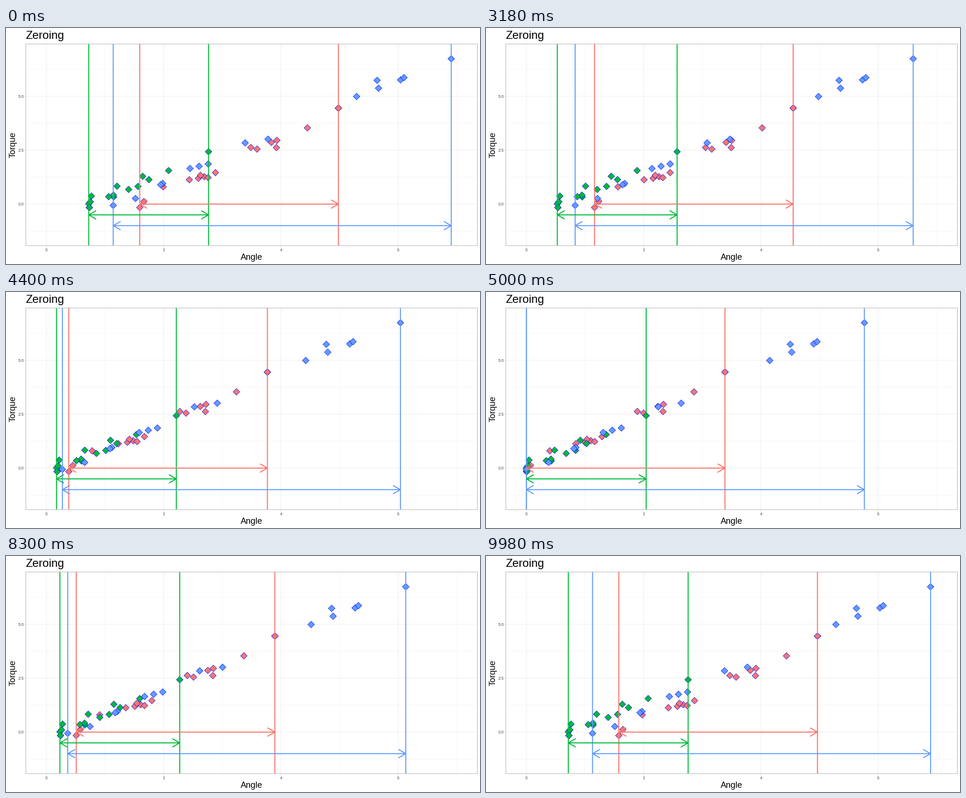
Animation, 1000 px wide and 500 px high, one loop 10000 ms. Source, as a matplotlib script:

```python
import numpy as np
import matplotlib.pyplot as plt
from matplotlib.animation import FuncAnimation

W, H, DPI = 1000, 500, 100
PX = 72 / DPI                       # points per pixel

# Panel edges in pixels; axes run 0..7 and -1.5..7 with 5% padding
LEFT, RIGHT, TOP, BOTTOM = 41.8, 994.5, 33.9, 461.0
XUNIT = (RIGHT - LEFT) / (7 * 1.1)
YUNIT = (BOTTOM - TOP) / (8.5 * 1.1)

STEP_MS = 25
MOVE = 100                          # steps per slide, also per rest
FRAMES = 4 * MOVE

# colour, arrow level, start angle, key samples (zeroed angle, torque)
GROUPS = [
    ("#F8766D", 0.0, 1.593,
     [(1.10, 1.27), (3.387, 4.45), (0.40, 0.80), (1.29, 1.46),
      (3.387, 4.45), (2.33, 2.62), (0, -0.16), (2.00, 2.55), (0.07, 0.12)]),
    ("#00BA38", -0.5, 0.723,
     [(0.92, 1.29), (0.045, 0.37), (0.01, -0.16), (0.84, 0.82),
      (0, 0.01), (0.68, 0.68), (2.043, 2.43), (0.01, -0.16)]),
    ("#619CFF", -1.0, 1.14,
     [(5.764, 6.74), (4.15, 4.99), (4.90, 5.76), (0.38, 0.26),
      (1.31, 1.65), (1.62, 1.86), (0, -0.06), (4.50, 5.74)]),
]

plt.rcParams["font.family"] = "Liberation Sans"


def px(angle):
    return LEFT + XUNIT * (angle + 0.35)


def py(torque):
    return BOTTOM - YUNIT * (torque + 1.925)


def with_midpoints(keys):
    """Key samples plus one sample halfway between each pair of neighbours."""
    keys = np.array(keys)
    return np.vstack([keys, (keys[1:] + keys[:-1]) / 2])


fig = plt.figure(figsize=(W / DPI, H / DPI), dpi=DPI, facecolor="white")
ax = fig.add_axes([0, 0, 1, 1])
ax.set_xlim(0, W)
ax.set_ylim(H, 0)
ax.axis("off")


def stroke(xs, ys, color, width, z):
    line, = ax.plot(xs, ys, color=color, lw=width * PX, zorder=z, snap=False,
                    solid_capstyle="butt", solid_joinstyle="round")
    return line


def label(x, y, text, size, color="black", ha="center", rotation=0):
    ax.text(x, y, text, size=size * PX, color=color, ha=ha, va="baseline",
            rotation=rotation, rotation_mode="anchor")


def grid(xs, ys, width, z):
    for x in xs:
        stroke([px(x)] * 2, [TOP, BOTTOM], "#DEDEDE", width, z)
    for y in ys:
        stroke([LEFT, RIGHT], [py(y)] * 2, "#DEDEDE", width, z)


# Static parts
X_TICKS, Y_TICKS = np.arange(0, 7, 2), np.arange(0, 6, 2.5)
grid(X_TICKS + 1, np.arange(-1.25, 7, 2.5), 0.27, 0)
grid(X_TICKS, Y_TICKS, 0.53, 1)
stroke([LEFT, RIGHT, RIGHT, LEFT, LEFT], [TOP, TOP, BOTTOM, BOTTOM, TOP],
       "#B3B3B3", 1.07, 9)
for a in X_TICKS:
    stroke([px(a)] * 2, [BOTTOM, BOTTOM + 2.75], "#B3B3B3", 0.53, 1)
    label(px(a), 473.2, str(a), 8.8, "#4D4D4D")
for t in Y_TICKS:
    stroke([LEFT - 2.75, LEFT], [py(t)] * 2, "#B3B3B3", 0.53, 1)
    label(37.3, py(t) + 3.2, f"{t:.1f}", 8.8, "#4D4D4D", "right")
label(41.5, 23, "Zeroing", 24, ha="left")
label((LEFT + RIGHT) / 2, 491, "Angle", 18)
label(19.2, (TOP + BOTTOM) / 2, "Torque", 18, rotation=90)

# Moving parts
colors, levels, starts, keys = zip(*GROUPS)
starts = np.array(starts)
samples = [with_midpoints(k) for k in keys]
spans = [s[:, 0].max() for s in samples]
owner = np.repeat(np.arange(len(GROUPS)), [len(s) for s in samples])
angle, torque = np.vstack(samples).T

SIDE = 7.1 * np.sqrt(2) * PX
dots = ax.scatter(px(angle), py(torque), s=SIDE ** 2, marker="D",
                  c=[colors[i] for i in owner], edgecolors="blue",
                  linewidths=0.71 * PX, zorder=3, snap=False)

HEAD_X, HEAD_Y = 18 * np.cos(np.pi / 6), 18 * np.sin(np.pi / 6)


def arrow_path(length, y):
    xs = [0, length, np.nan, HEAD_X, 0, HEAD_X,
          np.nan, length - HEAD_X, length, length - HEAD_X]
    head = [np.nan, y - HEAD_Y, y, y + HEAD_Y]
    return np.array(xs), [y, y] + head + head


low_lines = [stroke([0, 0], [TOP, BOTTOM], c, 2.13, 4) for c in colors]
high_lines = [stroke([0, 0], [TOP, BOTTOM], c, 2.13, 5) for c in colors]
paths = [arrow_path(XUNIT * s, py(v)) for s, v in zip(spans, levels)]
arrows = [stroke(xs, ys, c, 2.13, 6) for c, (xs, ys) in zip(colors, paths)]


def progress(frame):
    """0 = raw angles, 1 = zeroed: rest, slide, rest, slide back."""
    stage, step = divmod(frame, MOVE)
    return (0, step / MOVE, 1, 1 - step / MOVE)[stage]


def update(frame):
    low = starts * (1 - progress(frame))
    dots.set_offsets(np.column_stack([px(angle + low[owner]), py(torque)]))
    for i, x in enumerate(low):
        low_lines[i].set_xdata([px(x)] * 2)
        high_lines[i].set_xdata([px(x + spans[i])] * 2)
        arrows[i].set_xdata(paths[i][0] + px(x))
    return []


anim = FuncAnimation(fig, update, frames=FRAMES, interval=STEP_MS,
                     init_func=lambda: update(0), repeat=True, repeat_delay=0)
plt.show()
```
